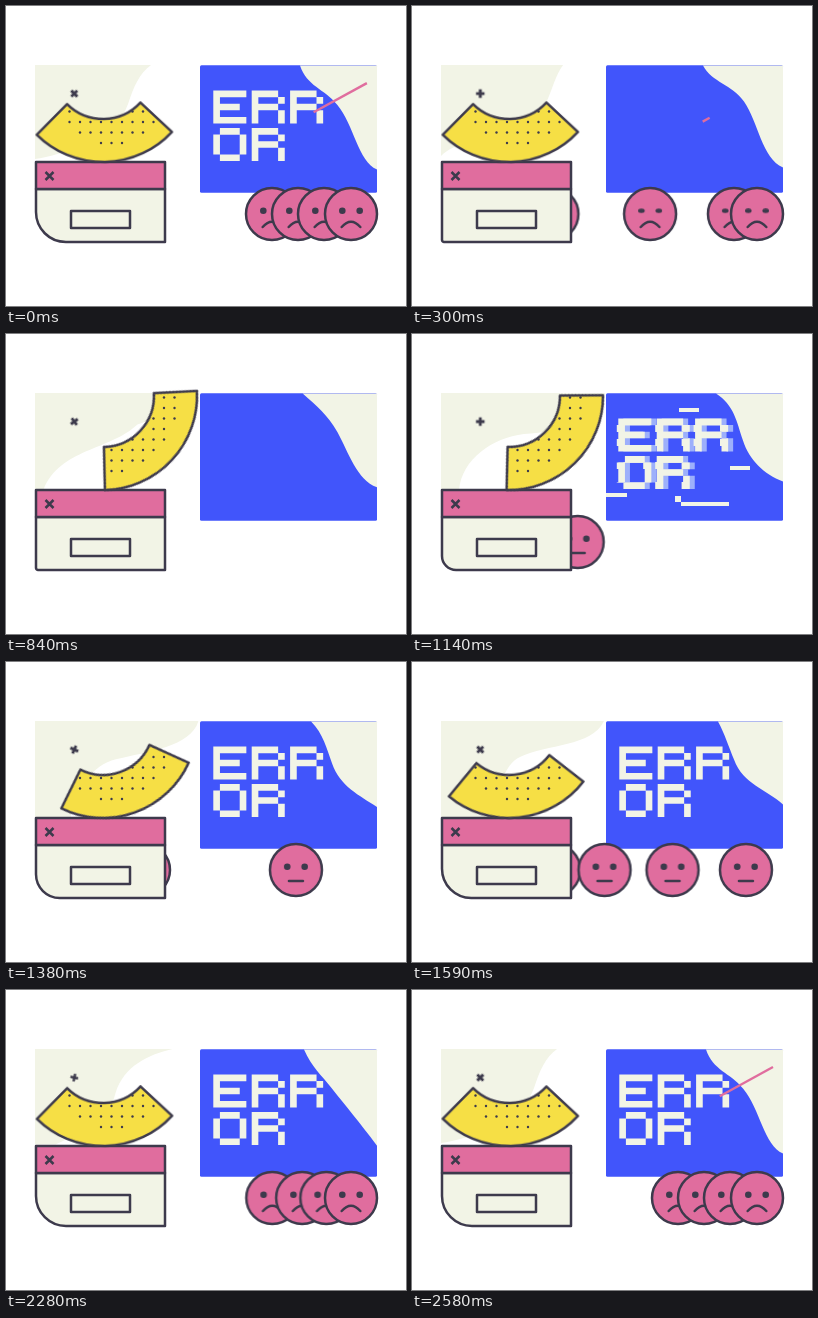
These frames come from a looping animation (400 px wide and 300 px high, 2610 ms). An HTML page:

```html
<!DOCTYPE html>
<html lang="en">
<head>
<meta charset="utf-8">
<title>Error</title>
<style>
html, body { margin: 0; width: 100%; height: 100%; overflow: hidden; background: #fff; }
svg { display: block; width: 100vw; height: 100vh; }
.line { stroke: #3d3a4c; stroke-width: 2.5; stroke-linejoin: round; }
.cream { fill: #f2f4e6; }
.pink { fill: #e06d9e; }
.dark { fill: #3d3a4c; }
.none { fill: none; }
.anim { animation: 2610ms linear infinite; }

#wave { animation-name: wave; }
@keyframes wave {
  0%, 98.85%, 100% { d: path("M29 59L145 59C133 68 128 80 122 98C112 130 55 150 29 153L29 153Z"); }
  11.5% { d: path("M29 59L151 59C143 70 141 82 134 97C115 135 55 125 29 150L29 150Z"); }
  21.84% { d: path("M29 59L161 59C158 66 153 72 149 82C125 128 58 105 29 155L29 155Z"); }
  43.68% { d: path("M29 59L193 59C190 85 150 98 112 100C80 104 50 125 47 156L29 156Z"); }
  60.92% { d: path("M29 59L192 59C180 85 135 82 108 95C92 102 85 130 80 156L29 156Z"); }
  75.86% { d: path("M29 59L188 59C150 62 108 72 97 108C95 130 85 140 70 156L29 156Z"); }
}

#blob { animation-name: blob; }
@keyframes blob {
  0%, 98.85%, 100% { d: path("M294 59C301 80 318 82 331 98C348 118 352 155 371 163L371 59Z"); }
  11.5% { d: path("M291 59C300 76 320 78 332 95C346 115 350 152 371 161L371 59Z"); }
  21.84% { d: path("M290 59C302 74 317 72 332 90C348 112 350 150 371 158L371 59Z"); }
  43.68% { d: path("M304 59C322 70 325 88 331 106C337 125 352 140 371 147L371 59Z"); }
  60.92% { d: path("M306 59C313 72 317 85 322 97C331 122 355 127 371 142L371 59Z"); }
  75.86% { d: path("M302 59C311 74 312 86 320 97C333 115 353 106 371 147L371 59Z"); }
}

.slice { transform-origin: 97px 62px; animation-name: swing; }
@keyframes swing {
  0%, 11.5% { transform: rotate(-1.2deg); animation-timing-function: cubic-bezier(.38, 0, .2, 1); }
  37.9% { transform: rotate(-48.5deg); animation-timing-function: cubic-bezier(.5, 0, .6, .95); }
  60.92% { transform: rotate(-6.3deg); animation-timing-function: cubic-bezier(.2, .6, .3, 1); }
  98%, 100% { transform: rotate(-1.2deg); }
}

#spark { animation-name: spark; }
@keyframes spark {
  0% { transform: translate(68.3px, 87.6px) rotate(45deg); }
  11.5% { transform: translate(68.3px, 87.6px) rotate(90deg); }
  21.84% { transform: translate(68.3px, 87.6px) rotate(110deg); }
  43.68% { transform: translate(68.3px, 87.6px) rotate(180deg); }
  60.92% { transform: translate(68.3px, 87.6px) rotate(225deg); }
  75.86% { transform: translate(68.3px, 87.6px) rotate(250deg) scale(.8); }
  98.85%, 100% { transform: translate(68.3px, 87.6px) rotate(315deg); }
}

#body { animation-name: corner; }
@keyframes corner {
  0%, 70%, 100% { d: path("M30 183L159 183L159 236L60 236C43.4 236 30 222.6 30 206Z"); }
  10%, 35% { d: path("M30 183L159 183L159 236L32 236C31 236 30 235 30 234Z"); }
  43.68% { d: path("M30 183L159 183L159 236L44 236C36.3 236 30 229.7 30 222Z"); }
  58% { d: path("M30 183L159 183L159 236L59 236C43 236 30 223 30 207Z"); }
}

.face { animation-timing-function: ease-in-out; }
#f1 { animation-name: first; }
#f2 { animation-name: second; }
#f3 { animation-name: third; }
#f4 { animation-name: fourth; }
@keyframes first {
  0%, 14.5% { transform: translate(345px, 208px); }
  30.4% { transform: translate(100px, 208px); }
  37.6% { transform: translate(100px, 208px); animation-timing-function: ease; }
  70.3% { transform: translate(347px, 208px); }
  85%, 100% { transform: translate(345px, 208px); }
}
@keyframes second {
  0% { transform: translate(318px, 208px); }
  11.3% { transform: translate(322px, 208px); }
  27.4% { transform: translate(100px, 208px); }
  48.85% { transform: translate(100px, 208px); animation-timing-function: ease; }
  77.5% { transform: translate(325px, 208px); }
  94%, 100% { transform: translate(318px, 208px); }
}
@keyframes third {
  0%, 5.75% { transform: translate(292px, 208px); }
  21.5% { transform: translate(100px, 208px); }
  53.5% { transform: translate(100px, 208px); animation-timing-function: ease; }
  80.5% { transform: translate(299px, 208px); }
  96%, 100% { transform: translate(292px, 208px); }
}
@keyframes fourth {
  0%, 1% { transform: translate(266px, 208px); }
  17% { transform: translate(100px, 208px); }
  54.4% { transform: translate(100px, 208px); animation-timing-function: ease; }
  90.5% { transform: translate(267px, 208px); }
  98%, 100% { transform: translate(266px, 208px); }
}

.mouth { animation-name: mouth; }
@keyframes mouth {
  0%, 29%, 73%, 100% { d: path("M-9.3 13Q0 2.5 9.3 13"); }
  36%, 64% { d: path("M-7 11Q0 11 7 11"); }
}
.eyes { transform-origin: 0 -3px; animation-name: blink; }
@keyframes blink {
  0%, 10.7%, 15.3%, 100% { transform: scaleY(1); }
  13% { transform: scaleY(.1); }
}

#dash { animation-name: dash; }
@keyframes dash {
  0%, 98.85%, 100% { stroke-dasharray: 75 300; stroke-dashoffset: 0; }
  5% { stroke-dasharray: 68 300; stroke-dashoffset: -25; }
  11.5% { stroke-dasharray: 10 300; stroke-dashoffset: -89; }
  13%, 91.5% { stroke-dasharray: 0 300; stroke-dashoffset: -100; }
  91.6% { stroke-dasharray: 0 300; stroke-dashoffset: 0; }
}

#clean, #glitch { animation-timing-function: step-end; }
#clean { animation-name: clean; }
#glitch { animation-name: glitch; }
@keyframes clean {
  0%, 48.3%, 100% { opacity: 1; }
  2.3% { opacity: 0; }
}
@keyframes glitch {
  0%, 6.9%, 48.3%, 100% { opacity: 0; transform: none; }
  2.3%, 42.1% { opacity: 1; transform: none; }
  4.6%, 45.9% { opacity: 1; transform: translate(3px, 0); }
}
</style>
</head>
<body>
<svg viewBox="0 0 400 300" role="img" aria-label="Error">
  <defs>
    <path id="ring" d="M29.4 127.3A94 94 0 0 0 164.6 127.3L133.7 97.4A51 51 0 0 1 60.3 97.4Z"/>
    <path id="word"/>
    <clipPath id="cut"><path class="anim slice" d="M29.4 127.3A94 94 0 0 0 164.6 127.3L133.7 97.4A51 51 0 0 1 60.3 97.4Z"/></clipPath>
    <clipPath id="bands"><path d="M194 91h177v7h-177zM194 105h177v7h-177zM194 128h177v7h-177zM194 148h177v8h-177z"/></clipPath>
  </defs>

  <path id="wave" class="anim cream"/>
  <rect x="194" y="59.2" width="177" height="127.6" rx="1.5" fill="#4155fb"/>
  <path id="blob" class="anim cream" transform="translate(0 .6)"/>

  <use id="clean" class="anim cream" href="#word"/>
  <g id="glitch" class="anim cream">
    <use href="#word" x="4" fill="#9db0fb"/>
    <use href="#word" x="-1"/>
    <g clip-path="url(#bands)"><use href="#word" x="-2.5"/></g>
    <path d="M267 74h20v4h-20zM318 132h20v4h-20zM194 159h21v4h-21zM263 162h6v6h-6zM269 168h48v4h-48z"/>
  </g>
  <path id="dash" class="anim none" d="M361 77L290 116" pathLength="100" stroke="#e06d9e" stroke-width="2.4"/>

  <g id="faces"></g>

  <path id="body" class="anim cream line"/>
  <path class="pink line" d="M30 183V156H159V183Z"/>
  <path class="none line" d="M39.5 166l8 8m0 -8l-8 8"/>
  <rect class="none line" x="65" y="205" width="59" height="17"/>

  <path id="spark" class="anim none line" style="stroke-width:2.8" d="M-4.3 0H4.3M0 -4.3V4.3"/>

  <use class="anim slice" href="#ring" fill="#f6df45"/>
  <g id="dots" class="dark" clip-path="url(#cut)"></g>
  <use class="anim slice none line" href="#ring"/>
</svg>
<script>
const $ = id => document.getElementById(id);

// Pixel lettering, five cells to a side
const glyphs = {
  E: '#####|#....|####.|#....|#####',
  R: '####.|#...#|####.|#...#|#...#',
  O: '.###.|#...#|#...#|#...#|.###.'
};
const cell = 6.6;
const letter = (ch, x, y) => glyphs[ch].split('|').map((row, j) =>
  [...row].map((c, i) => c === '#'
    ? `M${x + i * cell} ${y + j * cell}h${cell + .05}v${cell + .05}h${-cell - .05}z` : '').join('')).join('');
const row = (text, y) => [...text].map((ch, i) => letter(ch, 207.3 + i * 38.4, y)).join('');
$('word').setAttribute('d', row('ERR', 84.5) + row('OR', 122));

// Fixed dot grid, revealed by the swinging slice
let dots = '';
for (let y = 63.5; y < 140; y += 10.5) {
  for (let x = 63.5; x < 175; x += 10.5) {
    const r = Math.hypot(x - 97, y - 62);
    if (r > 52 && r < 77.8 && x > 38 + (y - 105) * 1.6) dots += `<circle cx="${x}" cy="${y}" r="1.2"/>`;
  }
}
$('dots').innerHTML = dots;

$('faces').innerHTML = [4, 3, 2, 1].map(n => `
  <g id="f${n}" class="anim face">
    <circle class="pink line" r="26"/>
    <g class="anim eyes dark"><circle cx="-8.7" cy="-3.2" r="3.3"/><circle cx="8.7" cy="-3.2" r="3.3"/></g>
    <path class="anim mouth none line" stroke-linecap="round"/>
  </g>`).join('');
</script>
</body>
</html>
```
